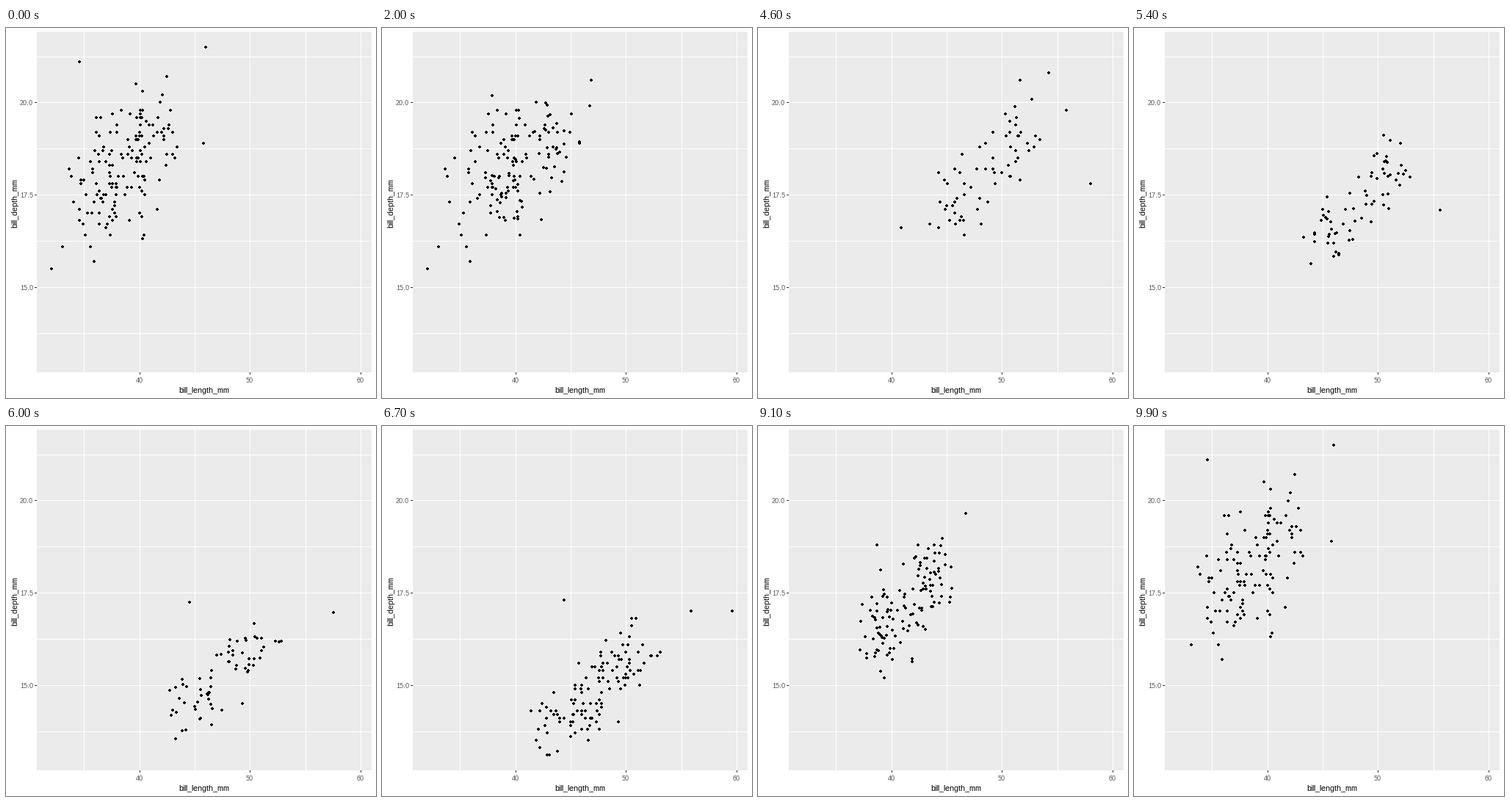
A matplotlib script that plays this animation: 504 px wide and 504 px high, repeating every 10 s.

```python
import numpy as np
import matplotlib.pyplot as plt
from matplotlib.animation import FuncAnimation
from matplotlib.collections import PolyCollection
from matplotlib.patches import Rectangle

SIZE = 504
FRAMES = 100
LEFT, TOP, RIGHT, BOTTOM = 42, 5, 498, 469

# crisp, pixel-fitted lettering
plt.rcParams.update({"font.family": "Liberation Sans",
                     "text.hinting": "native",
                     "text.hinting_factor": 1})
rng = np.random.default_rng(7)


def to_px(length, depth):
    return 62.3 + (length - 32.1) * 15.09, 26.05 + (21.5 - depth) * 50.27


def near(v):
    return np.floor(np.asarray(v) + 0.5)


def spread(corr):
    """A correlated normal pair, cut off far from the centre."""
    while True:
        u, v = rng.normal(size=2)
        if u * u + v * v < 5:
            return np.array([u, corr * u + np.sqrt(1 - corr ** 2) * v])


def species(n, mean, shift, sd, corr, outliers):
    """Small and large birds alternate, shifted either side of the mean."""
    sign = np.where(np.arange(n) % 2, 1, -1)[:, None]
    noise = np.array([spread(corr) for _ in range(n)])
    birds = np.round(mean + sign * np.array(shift) + noise * sd, 1)
    for row, point in outliers.items():
        birds[row] = point
    return birds


adelie = species(151, (38.8, 18.35), (1.4, 0.65), (2.1, 0.98), 0.1,
                 {14: (34.6, 21.1), 17: (42.5, 20.7), 19: (46.0, 21.5),
                  74: (45.8, 18.9), 99: (33.1, 16.1), 142: (32.1, 15.5)})
chinstrap = species(68, (48.6, 18.35), (2.3, 0.8), (1.6, 0.7), 0.25,
                    {17: (58.0, 17.8), 19: (49.2, 18.2), 31: (40.9, 16.6),
                     32: (54.2, 20.8), 64: (55.8, 19.8)})
gentoo = species(123, (47.3, 14.95), (1.8, 0.72), (2.0, 0.52), 0.25,
                 {17: (49.2, 15.2), 25: (42.9, 13.1), 34: (59.6, 17.0),
                  54: (44.4, 17.3), 100: (55.9, 17.0)})

# first frame, last frame, from, to
MOVES = [(11, 33, adelie, chinstrap),
         (45, 67, chinstrap, gentoo),
         (79, 100, gentoo, adelie)]


def ease(t):
    return 4 * t ** 3 if t < 0.5 else 1 - 4 * (1 - t) ** 3


def birds_at(frame):
    """Rows move in pairs; unpaired rows come and go when a move ends."""
    for start, end, a, b in MOVES:
        if frame <= start:
            return a
        if frame < end:
            k = min(len(a), len(b))
            e = ease((frame - start) / (end - start))
            return np.vstack([a[:k] + (b[:k] - a[:k]) * e, a[k:]])
    return adelie


fig = plt.figure(figsize=(7, 7), dpi=72, facecolor="white")
ax = fig.add_axes([0, 0, 1, 1])
ax.set(xlim=(0, SIZE), ylim=(SIZE, 0))
ax.axis("off")


def box(x, y, w, h, color):
    ax.add_patch(Rectangle((x, y), w, h, fc=color, ec="none", lw=0))


def label(x, y, text, size, color, **kw):
    ax.text(x, y, text, fontsize=size, color=color, va="baseline",
            rotation_mode="anchor", **kw)


box(LEFT, TOP, RIGHT - LEFT, BOTTOM - TOP, "#EBEBEB")
for length in range(35, 61, 5):
    x = near(to_px(length, 0)[0])
    box(x, TOP, 1, BOTTOM - TOP, "white")
    if length % 10 == 0:
        box(x, BOTTOM, 1, 3, "#333333")
        label(x, 483, str(length), 9, "#4D4D4D", ha="center")
for depth in np.arange(13.75, 21.5, 1.25):
    y = near(to_px(0, depth)[1])
    box(LEFT, y, RIGHT - LEFT, 1, "white")
    if depth % 2.5 == 0:
        box(LEFT - 3, y, 3, 1, "#333333")
        label(37, y + 4, f"{depth:.1f}", 9, "#4D4D4D", ha="right")

label(270, 497, "bill_length_mm", 11, "black", ha="center")
label(15, 238, "bill_depth_mm", 11, "black", ha="center", rotation=90)

# four-pixel dot without its corners
DOT = np.array([(-1, -2), (1, -2), (1, -1), (2, -1), (2, 1), (1, 1),
                (1, 2), (-1, 2), (-1, 1), (-2, 1), (-2, -1), (-1, -1)])
dots = PolyCollection([], facecolors="black", edgecolors="none", linewidths=0)
ax.add_collection(dots, autolim=False)


def update(frame):
    length, depth = birds_at(frame).T
    centers = near(np.column_stack(to_px(length, depth)))
    dots.set_verts(centers[:, None, :] + DOT)
    return [dots]


anim = FuncAnimation(fig, update, frames=FRAMES, interval=100, repeat=True)
plt.show()
```
